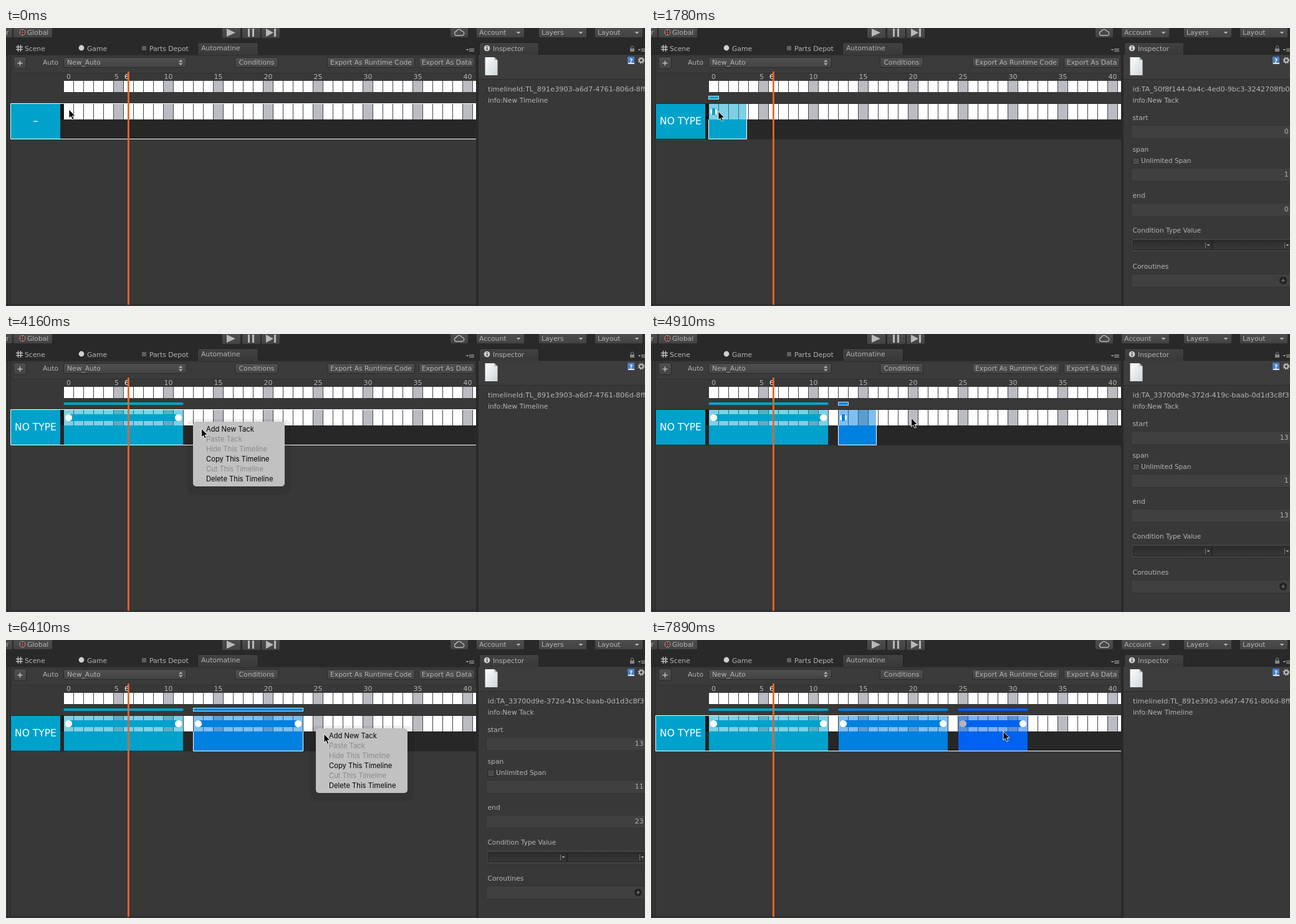
Recreate the animation shown at these times as an HTML page. Size 1025x447 px, loop 8 s.

```html
<!DOCTYPE html>
<html lang="en">
<head>
<meta charset="utf-8">
<title>Timeline editor</title>
<style>
html, body { margin: 0; width: 100%; height: 100%; overflow: hidden; background: #383838; }
svg { display: block; width: 1025px; height: 447px; }
text { font: 10.75px "DejaVu Sans", sans-serif; fill: #b4b4b4; white-space: pre; }
.menu text { font: 400 11.2px Inter, sans-serif; }
</style>
</head>
<body>
<svg id="stage" viewBox="0 0 1025 447">
  <defs>
    <linearGradient id="btn" x2="0" y2="1"><stop stop-color="#505050"/><stop offset="1" stop-color="#434343"/></linearGradient>
    <linearGradient id="tab" x2="0" y2="1"><stop stop-color="#424242"/><stop offset="1" stop-color="#393939"/></linearGradient>
    <linearGradient id="drop" x2="0" y2="1"><stop stop-color="#2b2b2b"/><stop offset="1" stop-color="#383838"/></linearGradient>
    <linearGradient id="page" x2="1" y2="1"><stop stop-color="#fdfdfd"/><stop offset="1" stop-color="#cfd6da"/></linearGradient>
    <clipPath id="left"><path d="M0 0H754V447H0Z"/></clipPath>
  </defs>
  <g id="base"></g>
  <g id="tacks" clip-path="url(#left)"></g>
  <path d="M195 70h2.8V445h-2.8Z" fill="#f4622a"/>
  <g id="panel"></g>
  <g id="menu" class="menu"></g>
  <path id="cursor" d="M0 0V14L3.2 11.2L5.4 16.2L7.8 15.2L5.6 10.3H9.9Z" fill="#000" stroke="#fff" stroke-width=".9"/>
</svg>
<script>
const LOOP = 8000, CELL = 16, X0 = 93;
const $ = id => document.getElementById(id);

const rect = (x, y, w, h, fill, more = '') =>
  `<rect x="${x}" y="${y}" width="${w}" height="${h}" fill="${fill}" ${more}/>`;
const path = (d, fill, more = '') => `<path d="${d}" fill="${fill}" ${more}/>`;
const dot = (x, y, r, fill, more = '') => `<circle cx="${x}" cy="${y}" r="${r}" fill="${fill}" ${more}/>`;
const text = (x, y, s, style = '', anchor = 'start') =>
  `<text x="${x}" y="${y}" text-anchor="${anchor}" style="${style}">${s}</text>`;
const button = (x, y, w, h) => rect(x + .5, y + .5, w - 1, h - 1, 'url(#btn)', 'rx="2.5" stroke="#2a2a2a"');
const arrow = (x, y, s = 3.5) => path(`M${x - s} ${y}h${2 * s}l${-s} ${s}Z`, '#b4b4b4');

function ticks(y, h) {
  let out = rect(X0, y, 661, h, '#40434a');
  for (let i = 0; i < 42; i++)
    out += rect(X0 + i * CELL, y, 15, h, i && i % 5 === 0 ? '#babcc2' : '#fff');
  return `<g clip-path="url(#left)">${out}</g>`;
}

function toolbar() {
  let out = rect(0, 0, 1025, 42, '#292929');
  out += button(-10, -8, 21, 24) + button(11, -8, 64, 24);
  out += text(0, 11, 'r') + text(34, 11, 'Global');
  out += dot(26.5, 7, 4.5, '#3a2b2b', 'stroke="#b9b0b0"') + path('M22 7h9M26.5 2.5v9', 'none', 'stroke="#c25a55"');
  for (const x of [346, 378, 409]) out += button(x, -6, 31, 23);
  out += path('M354 1L368 7.5L354 14ZM388 1h3v13h-3ZM395 1h3v13h-3ZM417 1L429 7.5L417 14ZM430 1h3v13h-3Z', '#b8b8b8');
  out += button(712, -6, 30, 22);
  out += path('M722 12a3.3 3.3 0 0 1 .4-6.5a4.6 4.6 0 0 1 8.6-.4a3.5 3.5 0 0 1 1 6.9Z', 'none', 'stroke="#b8b8b8" stroke-width="1.3"');
  for (const [x, s] of [[754, 'Account'], [854, 'Layers'], [944, 'Layout']])
    out += button(x, -6, 78, 22) + text(x + 5, 11, s) + arrow(x + 68, 6);
  return out;
}

function tabs() {
  let out = '';
  for (const [x, w] of [[307, 98], [759, 96]])
    out += path(`M${x + .5} 43V26q0-2.5 3-2.5h${w - 7}q3 0 3 2.5V43`, 'url(#tab)', 'stroke="#222"');
  out += path('M19.5 27v11M23.5 27v11M16 30.5h11M16 34.5h11', 'none', 'stroke="#c4c4c4" stroke-width="1.3"');
  out += dot(121, 32, 4.4, '#d0d0d0') + rect(218, 29, 7, 7, '#5f5f5f');
  out += dot(771.5, 32.5, 4.8, '#d0d0d0') + rect(770.8, 32, 1.6, 3.4, '#333') + rect(770.8, 29.4, 1.6, 1.6, '#333');
  for (const [x, s] of [[30, 'Scene'], [130, 'Game'], [230, 'Parts Depot'], [313, 'Automatine'], [781, 'Inspector']])
    out += text(x, x === 313 ? 36 : 37, s);
  for (const x of [738, 1014])
    out += arrow(x + 2, 34, 2.3) + path(`M${x + 5} 33.5h8M${x + 5} 35.5h8M${x + 5} 37.5h8`, 'none', 'stroke="#999"');
  out += rect(1001, 33, 7, 5, '#858585') + path('M1002.5 33v-2a2 2 0 0 1 4 0v2', 'none', 'stroke="#858585"');
  return out;
}

function base() {
  let out = rect(0, 0, 1025, 447, '#383838') + toolbar();
  out += path('M0 42.5H1025', 'none', 'stroke="#232323"') + tabs();
  out += rect(308, 42, 96, 1, '#393939') + rect(760, 42, 94, 1, '#393939');
  out += rect(2, 42, 1, 405, '#242424') + rect(6, 42, 1, 403, '#242424');
  out += rect(754, 42, 4, 405, '#292929') + rect(0, 444, 755, 1, '#232323');
  out += rect(9.5, 44.5, 744, 28, '#3b3b3b', 'stroke="#303030"');

  out += button(12, 46, 21, 20) + path('M22.5 52.5v8M18.5 56.5h8', 'none', 'stroke="#c4c4c4" stroke-width="1.4"');
  out += text(59, 59, 'Auto') + button(92, 47, 198, 17) + text(98, 59, 'New_Auto');
  out += path('M277 54.5l3.2-3.5l3.2 3.5ZM277 56.5l3.2 3.5l3.2-3.5Z', '#b4b4b4');
  for (const [x, w, s] of [[367, 70, 'Conditions'], [515, 141, 'Export As Runtime Code'], [662, 90, 'Export As Data']])
    out += button(x, 47, w, 17) + text(x + w / 2, 59, s, '', 'middle');

  for (let i = 0; i <= 40; i += 5)
    out += text(100.5 + i * CELL - (i === 5 ? 3 : 0), 82, i, 'font-size:11px', 'middle');
  out += text(193.5, 82, 6, 'font-size:11px;fill:#fff', 'middle');
  out += ticks(85, 18);
  out += rect(7, 121, 747, 58, '#272727') + rect(87, 122, 6, 25, '#141414') + ticks(122, 25);
  out += rect(8, 122, 79, 56, '#00a2cb');

  out += rect(758, 43, 267, 39, '#3d3d3d') + rect(758, 82, 267, 1, '#2c2c2c');
  out += path('M768.5 47h15l5 5v24h-20Z', 'url(#page)') + path('M783.5 47v5h5Z', '#aeb6ba');
  out += rect(997, 46, 11, 12, '#4b7fc4', 'rx="1"') + rect(998, 56, 10, 2, '#dfe5ee');
  out += text(1002.5, 55.5, '?', 'font-size:9px;font-weight:bold;fill:#fff', 'middle');
  out += dot(1019, 52, 3, 'none', 'stroke="#b8b8b8" stroke-width="2.2"');
  out += dot(1019, 52, 4.6, 'none', 'stroke="#b8b8b8" stroke-width="1.6" stroke-dasharray="1.8 1.81"');
  return out;
}

// Moments of change: first, last, count
const bursts = [[0, 0, 1], [300, 890, 5], [1330, 2370, 8], [2520, 2670, 2], [2970, 3410, 4], [3710, 3860, 2],
  [4160, 5060, 7], [5210, 5510, 3], [5960, 6110, 2], [6410, 7450, 8], [7600, 7890, 3]];
const moments = bursts.flatMap(([a, b, n]) =>
  Array.from({ length: n }, (_, k) => n > 1 ? Math.floor((a + (b - a) * k / (n - 1)) / 10) * 10 : a));

// Pointer way: time, x, y
const way = [[0, 101, 131], [300, 101, 131], [890, 140, 147], [1330, 140, 147], [1620, 118, 138], [1770, 108, 134],
  [2370, 285, 134], [2670, 309.5, 133], [2970, 309.5, 133], [3410, 298, 133], [3710, 298, 133], [3860, 309, 149],
  [4160, 313.5, 152], [4460, 345, 154], [4610, 345, 153], [4760, 318, 136], [4910, 417.5, 135], [5060, 450, 135],
  [5210, 476, 134], [5510, 495, 134], [5960, 495, 134], [6110, 506, 149], [6410, 510, 151], [6700, 538, 154],
  [6850, 530, 148], [7000, 503, 135], [7450, 598, 134], [7600, 600, 136], [7890, 565, 147]];

function pointer(t) {
  const i = way.findIndex(p => p[0] > t);
  if (i < 0) return way[way.length - 1].slice(1);
  const [a, x, y] = way[i - 1], [b, u, v] = way[i], k = (t - a) / (b - a);
  return [x + (u - x) * k, y + (v - y) * k];
}

const list = [
  { id: 'TA_50f8f144-0a4c-4ed0-9bc3-3242708fb0', color: '#00a2cb', start: 0, span: 12, born: 1470, drag: 1770, drop: 2520, until: 2970 },
  { id: 'TA_33700d9e-372d-419c-baab-0d1d3c8f3', color: '#0080df', start: 13, span: 11, born: 4610, drag: 5210, drop: 5510, until: 6850 },
  { id: 'TA_c81b62f0-95d3-4e7a-a1f4-6b20e97d5', color: '#0062ee', start: 25, span: 7, born: 6850, drag: 7140, drop: 7600, until: 7740 }
];
const menus = [
  { x: 103, y: 139, open: 300, hover: 590, close: 1330 },
  { x: 300, y: 141, open: 3710, hover: 4310, close: 4610 },
  { x: 497, y: 142, open: 5960, hover: 6550, close: 6850 }
];
const items = ['Add New Tack', 'Paste Tack', 'Hide This Timeline', 'Copy This Timeline', 'Cut This Timeline', 'Delete This Timeline'];
const disabled = [1, 2, 4];

function spanAt(k, t, px) {
  if (t >= k.drop) return k.span;
  if (t < k.drag) return 1;
  const cells = Math.floor((px - X0) / CELL) - k.start + 1;
  return Math.max(1, Math.min(k.span, cells));
}

function drawTack(k, t, px, selected) {
  const span = spanAt(k, t, px), x = X0 + k.start * CELL, long = span * CELL - 1;
  const w = Math.max(long, 60), a = x + 7.5, b = a + (span - 1) * CELL;
  let out = selected
    ? rect(x - .5, 109.5, long + 1, 5, k.color, 'stroke="#c4e4f0"')
    : rect(x - .5, 110, long + 1, 4, k.color, 'rx="1.5"');
  out += rect(x, 122, w, 25, k.color, 'opacity=".5"') + rect(x, 147, w, 31, k.color);
  const grey = '#b3b6bd', held = t >= k.drag && t < k.drop;
  const first = k.start === 25 && t >= k.drag ? grey : '#fff';
  if (span === 1) out += dot(a, 134.5, 5.6, first) + rect(a - 2.5, 129, 5, 11, k.color);
  else out += rect(a, 129, b - a, 11, k.color) + dot(a, 134.5, 5.6, first)
    + dot(b, 134.5, 5.6, held && k.start < 25 ? grey : '#fff');
  if (selected) out += path(`M${x - .5} 147V178.5h${w + 1}V147`, 'none', 'stroke="#fff"');
  return out;
}

function drawMenu(m, t) {
  const { x, y } = m;
  let out = rect(x - 10, y - 4, 167, 122, '#000', 'rx="12" opacity=".07"') + rect(x, y, 147, 104, '#c1c1c1', 'rx="5"');
  const lit = t >= m.hover;
  if (lit) out += rect(x, y + 4, 147, 16, '#0a6bdc');
  items.forEach((s, i) => {
    const ink = lit && i === 0 ? '#fff' : disabled.includes(i) ? '#8a8a8a' : '#000';
    out += text(x + 21, y + 16 + i * 16, s, `fill:${ink}`);
  });
  return out;
}

function drawPanel(k, t) {
  const big = 'font-size:11.25px';
  if (!k) return text(773, 102, 'timelineId:TL_891e3903-a6d7-4761-806d-8ff', big) + text(773, 120, 'info:New Timeline');
  const span = t >= k.drop ? k.span : 1;
  const field = (y, s) => rect(770.5, y + .5, 260, 21, '#404040', 'stroke="#333"')
    + text(1022.5, y + 14, s, '', 'end');
  let out = text(772.5, 102, 'id:' + k.id, big) + text(772.5, 120, 'info:New Tack');
  out += text(772.5, 148, 'start') + field(156, k.start);
  out += text(772.5, 199, 'span') + rect(772.5, 208.5, 11, 11, '#4a4a4a', 'rx="2" stroke="#242424"');
  out += text(786, 217, 'Unlimited Span', 'font-size:10.5px') + field(225, span);
  out += text(772.5, 273, 'end') + field(281, k.start + span - 1);
  out += text(772.5, 329, 'Condition Type Value', 'font-size:10.5px') + rect(770.5, 337.5, 260, 23, '#404040', 'stroke="#333"');
  for (const x of [773, 900])
    out += rect(x + .5, 341.5, 126, 15, 'url(#drop)', 'stroke="#242424"') + rect(x + 116, 345, 1, 9, '#777') + arrow(x + 121, 348, 2.5);
  out += text(772.5, 387, 'Coroutines') + field(395, '');
  out += dot(1014, 406, 6, '#1f1f1f') + path('M1014 402.8v6.4M1010.8 406h6.4', 'none', 'stroke="#707070" stroke-width="1.5"');
  return out;
}

function draw(t) {
  const [px, py] = pointer(t);
  const chosen = list.find(k => t >= k.born && t < k.until);
  let out = t < list[0].born
    ? rect(44, 149.5, 7, 1.2, '#fff')
    : text(47.5, 155, 'NO TYPE', 'font-size:15.5px;fill:#fff', 'middle');
  for (const k of list) if (t >= k.born) out += drawTack(k, t, px, k === chosen);
  if (!chosen) out += path('M754 121.5H7.5V178.5H754', 'none', 'stroke="#fff"');
  $('tacks').innerHTML = out;
  $('panel').innerHTML = drawPanel(chosen, t);
  const m = menus.find(m => t >= m.open && t < m.close);
  $('menu').innerHTML = m ? drawMenu(m, t) : '';
  $('cursor').setAttribute('transform', `translate(${px} ${py})`);
}

$('base').innerHTML = base();
let shown = -1;
const begin = performance.now();
function tick() {
  const t = (performance.now() - begin) % LOOP;
  const now = moments.filter(m => m <= t).pop();
  if (now !== shown) draw(shown = now);
  requestAnimationFrame(tick);
}
tick();
</script>
</body>
</html>
```
